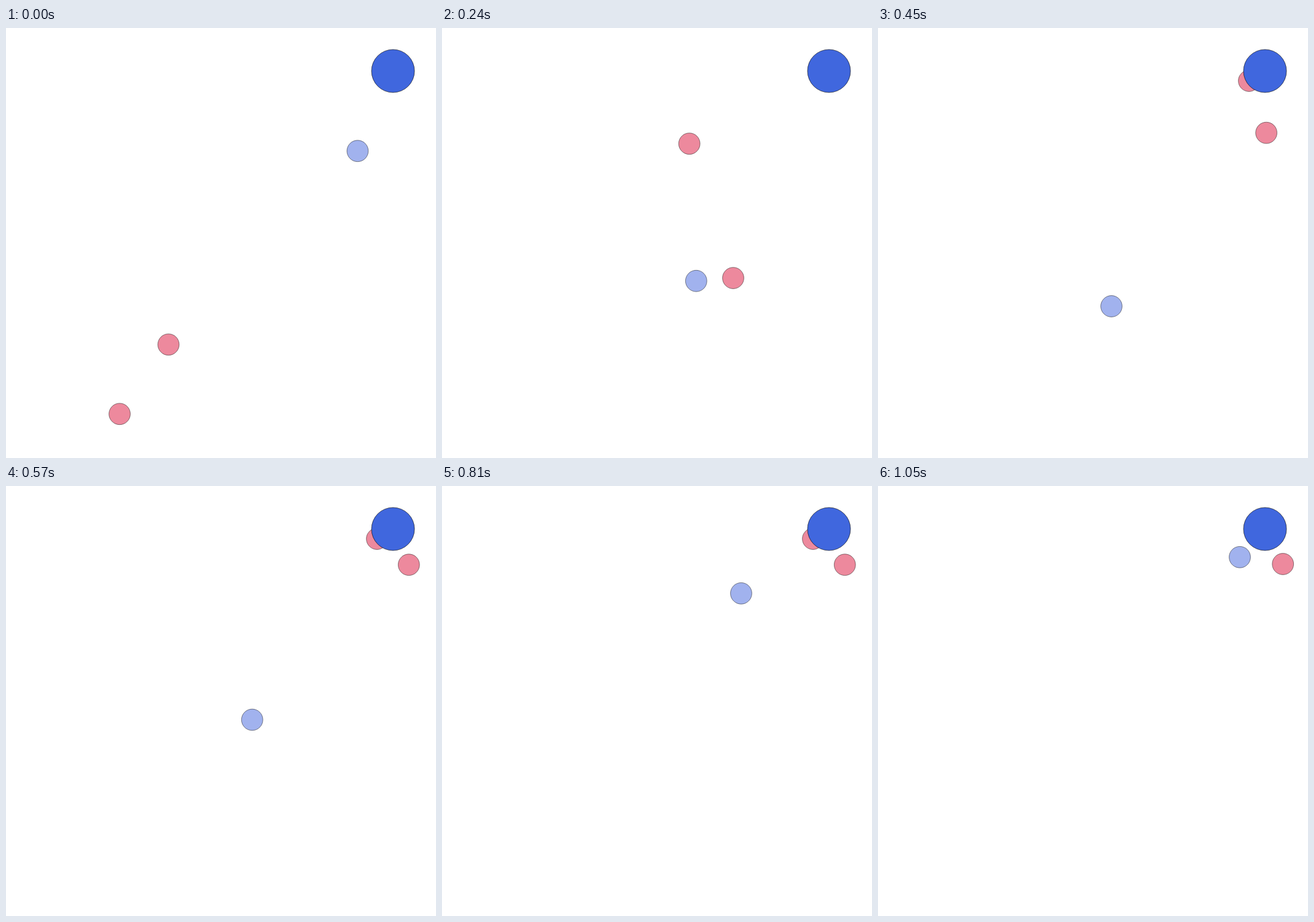
These frames come from a looping animation (700 px wide and 700 px high, 1080 ms). An HTML page:

```html
<!DOCTYPE html>
<html lang="en">
<head>
<meta charset="utf-8">
<title>Agents</title>
<style>
  html, body { margin: 0; width: 100%; height: 100%; overflow: hidden; background: #fff; }
  svg { display: block; width: 100%; height: 100%; }
  circle { stroke: #000; stroke-opacity: .6; stroke-width: 1; }
  #agents circle { stroke-opacity: .45; }
</style>
</head>
<body>
<svg viewBox="0 0 700 700">
  <g id="agents"></g>
  <circle cx="630" cy="70" r="35" fill="#4067de"/>
</svg>
<script>
const LOOP = 1080, STEP = 30;
const PINK = "#ed899d", PALE_BLUE = "#a1b2ee";

const lerp = (a, b, u) => a + (b - a) * u;
const mix = (p, q, u) => p.map((value, axis) => lerp(value, q[axis], u));

// De Casteljau: blend neighbouring points until one is left.
function bezier(points, u) {
  while (points.length > 1) {
    points = points.slice(1).map((point, i) => mix(points[i], point, u));
  }
  return points[0];
}

class Agent {
  constructor(fill, start) {
    this.end = start;
    this.velocity = [0, 0];
    this.legs = [];
    this.node = document.createElementNS("http://www.w3.org/2000/svg", "circle");
    this.node.setAttribute("r", 17.4);
    this.node.setAttribute("fill", fill);
    document.getElementById("agents").append(this.node);
  }

  // Follow a cubic curve from the last end point.
  fly(begin, duration, control1, control2, end) {
    this.legs.push({ begin, duration, points: [this.end, control1, control2, end] });
    this.velocity = end.map((value, axis) => 3 * (value - control2[axis]) / duration);
    this.end = end;
    return this;
  }

  // Carry on at the current velocity and brake to a stop.
  settle(begin, duration, end) {
    const ahead = this.end.map((value, axis) => value + this.velocity[axis] * duration / 3);
    return this.fly(begin, duration, ahead, end, end);
  }

  draw(time) {
    const leg = this.legs.findLast(({ begin }) => begin <= time);
    const [x, y] = bezier(leg.points, Math.min(1, (time - leg.begin) / leg.duration));
    this.node.setAttribute("cx", x);
    this.node.setAttribute("cy", y);
  }
}

const agents = [
  new Agent(PINK, [264.5, 515.3])
    .fly(0, 360, [299, 343.4], [358, 138.5], [564.7, 105.8])
    .settle(360, 90, [604, 86])
    .fly(840, 210, [600, 60], [625, 25], [631, 60]),
  new Agent(PINK, [185, 628.3])
    .fly(0, 360, [323, 512.8], [500.7, 430.4], [583.4, 265])
    .settle(360, 210, [655.8, 128.2])
    .settle(840, 210, [659.2, 127]),
  new Agent(PALE_BLUE, [572.4, 200.2])
    .fly(0, 360, [497.5, 257.3], [377, 463], [386.4, 477.2])
    .fly(360, 450, [356, 464], [433, 303], [487, 174.8])
    .settle(810, 240, [589, 115.8])
];

const start = performance.now();
function tick() {
  const time = (performance.now() - start) % LOOP;
  const stepped = Math.floor(time / STEP) * STEP;
  for (const agent of agents) agent.draw(stepped);
  requestAnimationFrame(tick);
}
tick();
</script>
</body>
</html>
```
